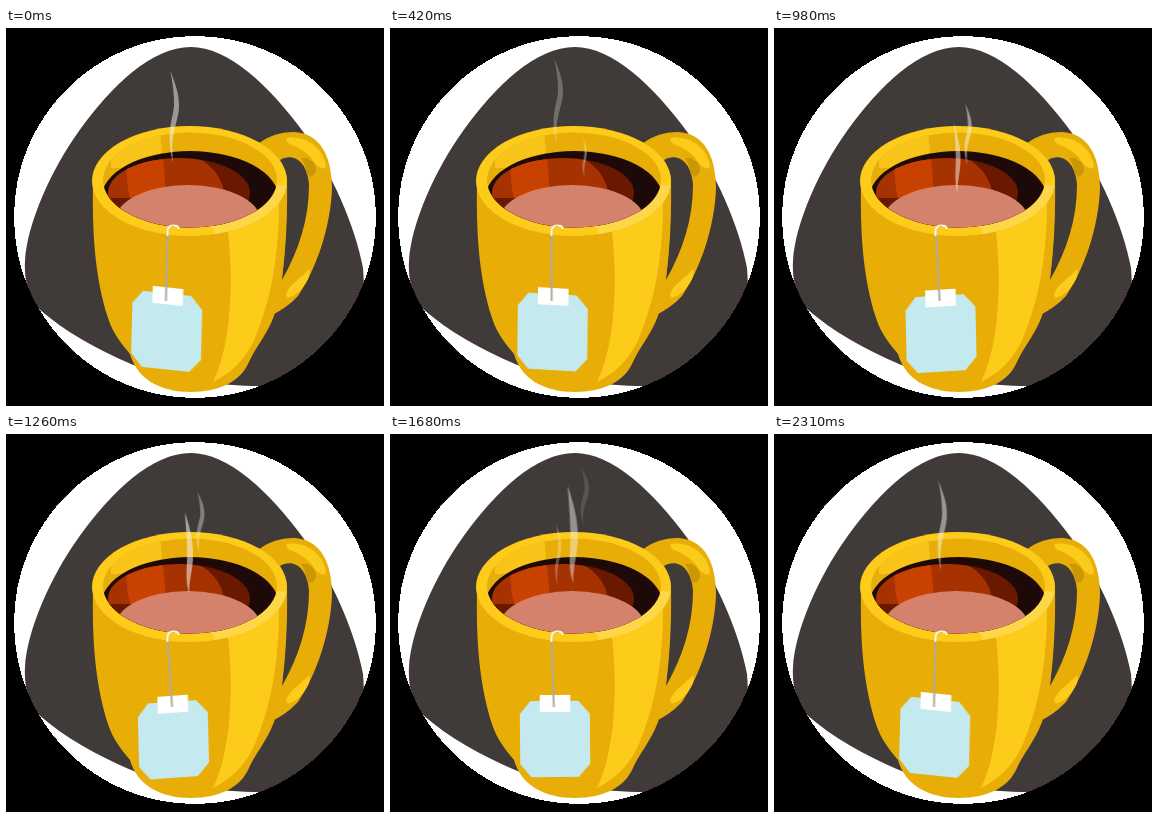
Write an HTML page without scripts that moves like this. It is 378 px wide and 378 px high and loops after 2.38 s.

```html
<!DOCTYPE html>
<html lang="en">
<head>
<meta charset="utf-8">
<title>Cup of tea</title>
<style>
html, body { margin: 0; width: 100%; height: 100%; overflow: hidden; background: #000; }
svg { display: block; width: 100vw; height: 100vh; }
.gold { fill: #e8ae07; }
.sun { fill: #fdcb1a; }
.amber { fill: #a63202; }

/* tea bag: swings on its string, the bag tilts a little more */
.string, .bag { animation: 1190ms cubic-bezier(.37, 0, .63, 1) infinite alternate; }
.string { transform-origin: 162px 200px; animation-name: swing; }
.bag { transform-origin: 164px 268px; animation-name: tilt; }
@keyframes swing {
  from { transform: rotate(1.2deg); }
  to { transform: rotate(-3.6deg); }
}
@keyframes tilt {
  from { transform: translate(-2.4px, -.6px) rotate(1.5deg) skewY(4.6deg); }
  to { transform: translate(2.6px, 1.8px) rotate(-1.5deg) skewY(-2.6deg); }
}

/* steam: each wisp is 100 units tall, placed by its tip */
.steam > * { fill: #f4efec; opacity: 0; animation: 2380ms linear infinite; }
.steam .a { animation-name: wispA; }
.steam .b { animation-name: wispB; }
.steam .c { animation-name: wispC; }
@keyframes wispA {
  0% { transform: translate(164px, 42px) scale(1, .93); opacity: .52; }
  17.6% { transform: translate(164px, 30px) scale(1, .88); opacity: .28; }
  29.4% { transform: translate(164px, 22px) scale(1, .8); opacity: .13; }
  38%, 54% { transform: translate(164px, 16px) scale(1, .74); opacity: 0; }
  54.1% { transform: translate(167px, 122px) scale(.4, .38); opacity: 0; }
  61.8% { transform: translate(166px, 105px) scale(.5, .5); opacity: .2; }
  82.4% { transform: translate(165px, 68px) scale(.85, .79); opacity: .45; }
  100% { transform: translate(164px, 42px) scale(1, .93); opacity: .52; }
}
@keyframes wispB {
  0%, 10% { transform: translate(193px, 122px) scale(.3, .3); opacity: 0; }
  17.6% { transform: translate(193px, 110px) scale(.4, .4); opacity: .45; }
  29.4% { transform: translate(191px, 93px) scale(.62, .52); opacity: .82; }
  41.2% { transform: translate(191px, 75px) scale(.75, .62); opacity: .52; }
  61.8% { transform: translate(191px, 43px) scale(.9, .62); opacity: .27; }
  80%, 100% { transform: translate(191px, 22px) scale(.9, .55); opacity: 0; }
}
@keyframes wispC {
  0%, 22% { transform: translate(181px, 132px) scale(.35, .4); opacity: 0; }
  29.4% { transform: translate(181px, 120px) scale(.4, .5); opacity: .36; }
  41.2% { transform: translate(180px, 95px) scale(.6, .7); opacity: .52; }
  61.8% { transform: translate(178px, 65px) scale(.85, .91); opacity: .62; }
  82.4% { transform: translate(177px, 34px) scale(1.05, 1.07); opacity: .3; }
  96%, 100% { transform: translate(176px, 20px) scale(1.1, 1.05); opacity: 0; }
}
</style>
</head>
<body>
<svg viewBox="0 0 378 378">
  <defs>
    <clipPath id="mouth"><ellipse cx="184" cy="152" rx="87" ry="47.5"/></clipPath>
    <clipPath id="glow"><ellipse cx="173" cy="165" rx="71" ry="35"/></clipPath>
    <clipPath id="rim"><ellipse cx="183.5" cy="153" rx="97.5" ry="55"/></clipPath>
    <path id="wisp" d="M0 0C5 14 9 24 9 38C9 56 0 66 3 100C-5 68 3 54 4 38C4 26 3 14 0 0Z"/>
  </defs>

  <!-- backdrop, cut to a hard-edged disc -->
  <rect width="378" height="378" fill="#fff"/>
  <path fill="#403a38" d="M185 19C222 19 263 57 298 105C326 146 349 197 357 240Q358 252 358 268L340 380L254 358C215 358 165 352 125 336C92 322 58 303 33 281C22 268 18 252 19 233C21 196 45 142 73 103C106 57 146 19 185 19Z"/>
  <path shape-rendering="crispEdges" fill-rule="evenodd" d="M0 0H378V378H0ZM8 189A181 181 0 0 0 370 189A181 181 0 0 0 8 189Z"/>

  <!-- handle -->
  <path class="gold" fill-rule="evenodd" d="M252 116C262 108 274 104 288 104C314 105 326 128 326 160C325 197 311 240 292 268Q281 280 264 288L262 130ZM274 132C287 124 302 134 303 157C303 191 293 222 276 252Q281 205 281 153Q280 142 274 132Z"/>
  <path class="sun" d="M281 110C298 107 317 119 320 137C320 143 313 141 309 135C302 124 292 119 284 116Q279 113 281 110Z"/>
  <path fill="#c99804" d="M295 130C303 128 310 135 310 142C309 149 303 150 301 147Q300 137 295 130Z"/>
  <path class="sun" d="M303 241C306 247 299 259 291 265C284 271 278 271 281 264C285 255 296 249 303 241Z"/>

  <!-- cup -->
  <path class="gold" d="M87 153C86 205 89 250 102 290C107 306 116 316 124 326C131 351 154 364 185 364C214 364 234 353 242 336C250 318 261 307 268 288C277 258 282 210 281 153Z"/>
  <path class="sun" d="M221 195C228 250 226 315 207 354Q236 340 249 310C266 270 273 225 273 175Z"/>
  <g clip-path="url(#rim)">
    <rect class="sun" x="80" y="95" width="205" height="115"/>
    <path fill="#fdd649" d="M184 152L213 215H290V158Z"/>
  </g>
  <g clip-path="url(#mouth)">
    <rect class="gold" x="90" y="100" width="190" height="105"/>
    <path fill="#f9c41a" d="M105 100H154L157 140H105Z"/>
    <ellipse cx="184" cy="171" rx="89" ry="48" fill="#1d0a08"/>
    <g clip-path="url(#glow)">
      <rect x="95" y="125" width="155" height="80" fill="#6b1800"/>
      <path class="amber" d="M95 125H180Q216 137 219 170H95Z"/>
      <path fill="#c94100" d="M121 125H156Q159 145 160 170H124Q119 150 121 125Z"/>
    </g>
    <ellipse cx="182" cy="193" rx="73" ry="36" fill="#d4826c"/>
  </g>

  <!-- tea bag -->
  <g class="bag">
    <path fill="#c4e9ef" d="M139.500 266H187.500L199 279V329L187.500 342H140L129 329V279Z"/>
    <path fill="#fff" d="M149 260H179.500V277H149Z"/>
  </g>
  <path class="string" fill="none" stroke="#b3a79c" stroke-width="2" d="M161.500 202V273"/>
  <path fill="none" stroke="#fbf3dc" stroke-width="2.200" stroke-linecap="round" d="M161.500 207V203Q162 197.500 167 197.500Q172 197.500 172.500 200"/>

  <g class="steam">
    <use class="a" href="#wisp"/>
    <use class="b" href="#wisp"/>
    <path class="c" d="M0 0C5 14 11 32 11 52C11 70 5 84 6 100C0 84 3 68 3 52C3 34 1 14 0 0Z"/>
  </g>
</svg>
</body>
</html>
```
